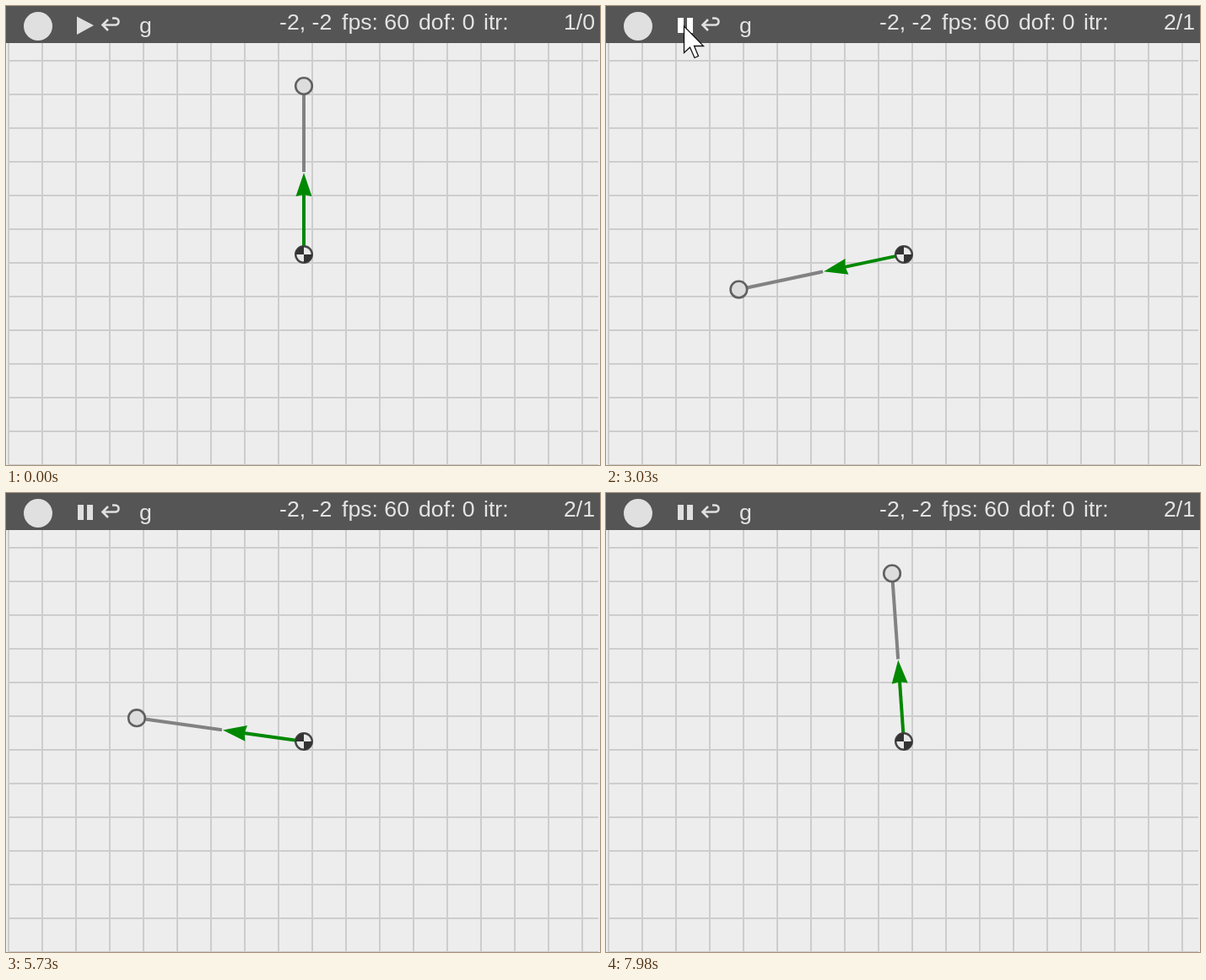
These frames come from a looping animation (704 px wide and 545 px high, 8000 ms). An HTML page:

```html
<!DOCTYPE html>
<html lang="en">
<head>
<meta charset="utf-8">
<title>Rotating crank</title>
<style>
  html, body { margin: 0; width: 100%; height: 100%; overflow: hidden; background: #ededed; }
  svg { display: block; }
  text { font: 26.67px "Liberation Sans", Arial, sans-serif; fill: #e4e4e4; white-space: pre; }
  #tip text { font: 22.2px "Open Sans", "Noto Sans", sans-serif; fill: #3a3a3a; }
</style>
</head>
<body>
<svg width="704" height="545" viewBox="0 0 704 545">
  <defs>
    <pattern id="grid" x="2" y="24" width="40" height="40" patternUnits="userSpaceOnUse">
      <path d="M1 0V40M0 1H40" stroke="#cdcdcd" stroke-width="2"/>
    </pattern>
  </defs>
  <rect width="704" height="545" fill="#ededed"/>
  <rect x="2" y="44" width="700" height="501" fill="url(#grid)"/>

  <g transform="translate(353 295)">
    <g id="crank">
      <path d="M0 -98V-190" stroke="#828282" stroke-width="4"/>
      <path d="M0 -9V-74" stroke="#080" stroke-width="4"/>
      <path d="M0 -97L9.5 -69L0 -71L-9.5 -69Z" fill="#080"/>
    </g>
    <circle id="node" r="9.8" fill="#ddd" stroke="#606060" stroke-width="2.6"/>
    <circle r="9.8" fill="#e8e8e8" stroke="#444" stroke-width="2.4"/>
    <path d="M0 -10A10 10 0 0 0 -10 0H10A10 10 0 0 1 0 10Z" fill="#333"/>
  </g>

  <rect width="704" height="44" fill="#555"/>
  <circle cx="38" cy="24" r="17" fill="#e0e0e0"/>
  <path id="button"/>
  <path d="M121 16L114.5 22.5L121 29M115 22.5H129.5A4 4 0 0 0 129.5 14.5H126" fill="none" stroke="#e0e0e0" stroke-width="2.6"/>
  <text x="158" y="32">g</text>
  <text x="324" y="28">-2, -2</text>
  <text x="398" y="28">fps: 60</text>
  <text x="489" y="28">dof: 0</text>
  <text x="566" y="28">itr:</text>
  <text id="count" x="698" y="28" text-anchor="end"></text>

  <g id="tip">
    <rect x="113" y="54" width="138" height="48" fill="#f5fdff" stroke="#333" stroke-width="2"/>
    <text x="128" y="87">run/pause</text>
  </g>
  <path id="cursor" d="M92.5 24V55.5L99.5 49L105 61.5L109.5 59.5L104.5 47.5H115.5Z" fill="#fff" stroke="#111" stroke-width="1.3"/>
</svg>
<script>
const LOOP = 8000, STEP = 30, ARM = 200;
const PLAY = "M84 12.5L104 23L84 34Z", PAUSE = "M85 14h7v18h-7zM96 14h7v18h-7z";

// [time in ms, counter-clockwise degrees]
const turns = [[2220, 0], [3030, 102], [3720, 190], [4530, 290], [4680, 312], [5340, 394],
  [5730, 442], [6150, 495], [6900, 588], [6960, 598], [7770, 698], [7980, 724]];

const el = id => document.getElementById(id);
const [crank, node, button, count, tip, cursor] =
  ["crank", "node", "button", "count", "tip", "cursor"].map(el);
const clamp = x => Math.min(1, Math.max(0, x));
const show = (e, on) => e.setAttribute("visibility", on ? "visible" : "hidden");

function angleAt(t) {
  if (t <= turns[0][0]) return 0;
  const i = turns.findIndex(k => t <= k[0]);
  const [t0, a0] = turns[i - 1], [t1, a1] = turns[i];
  return 2 * Math.round((a0 + (a1 - a0) * (t - t0) / (t1 - t0)) / 2);
}

function cursorShift(t) {
  const enter = clamp((t - 900) / 360), leave = clamp((t - 3030) / 360);
  return -64 * ((1 - enter) ** 2 + leave ** 2);
}

function draw(now) {
  const t = Math.floor((now % LOOP) / STEP) * STEP;
  const angle = angleAt(t), rad = angle * Math.PI / 180;
  crank.setAttribute("transform", `rotate(${-angle})`);
  node.setAttribute("cx", -ARM * Math.sin(rad));
  node.setAttribute("cy", -ARM * Math.cos(rad));

  const running = t >= 2130, shift = cursorShift(t);
  button.setAttribute("d", running ? PAUSE : PLAY);
  button.setAttribute("fill", shift > -16 ? "#fff" : "#e0e0e0");
  count.textContent = running ? "2/1" : "1/0";
  show(tip, t >= 1650 && t < 2130);
  show(cursor, shift > -64);
  cursor.setAttribute("transform", `translate(0 ${shift})`);
}

const start = performance.now();
function frame() {
  draw(performance.now() - start);
  requestAnimationFrame(frame);
}
frame();
</script>
</body>
</html>
```
